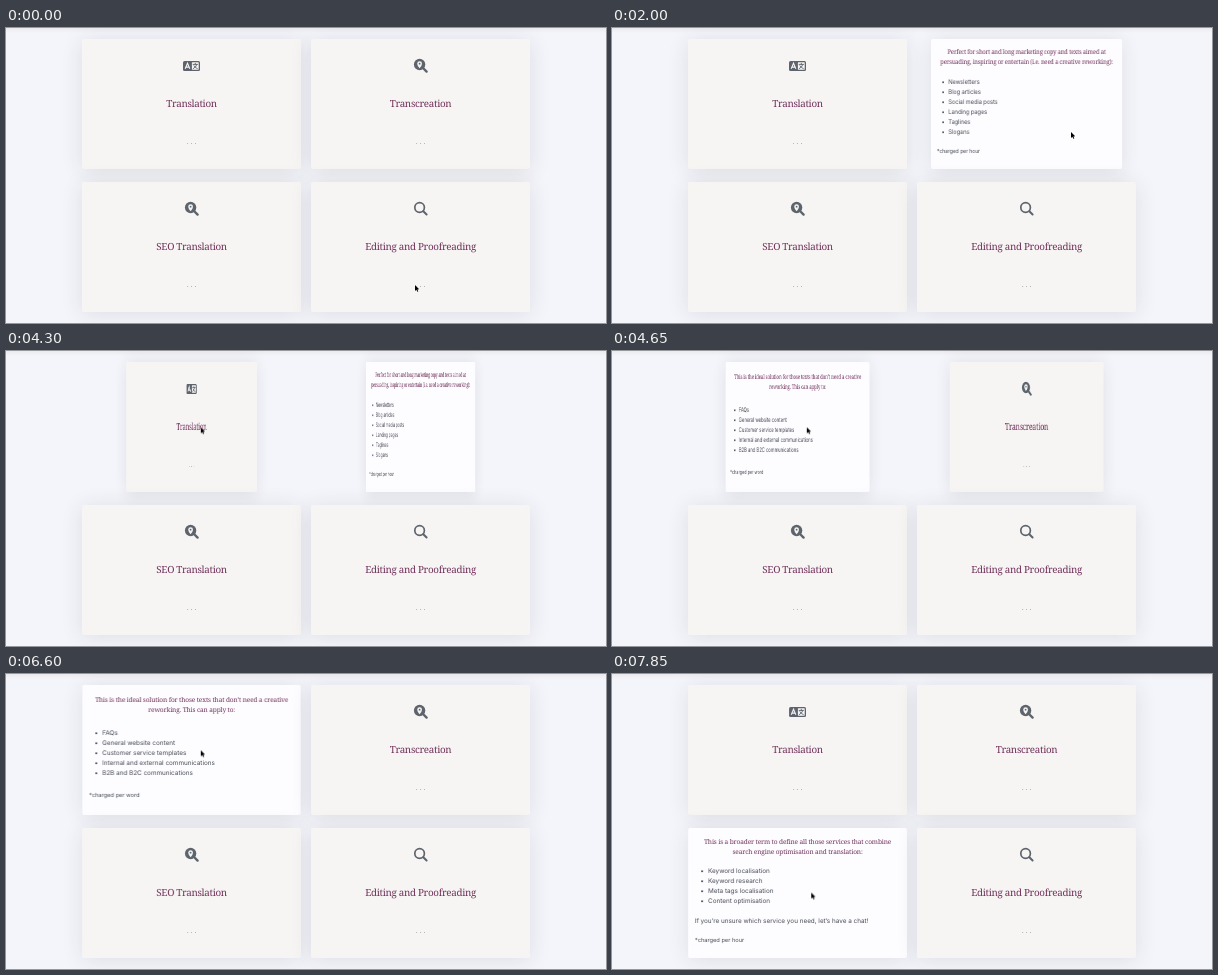
Recreate the animation shown at these times as an HTML page. Size 600 by 295 pixels, loop 8 s.

```html
<!DOCTYPE html>
<html lang="en">
<head>
<meta charset="utf-8">
<title>Service cards</title>
<style>
  html, body { margin: 0; width: 100%; height: 100%; overflow: hidden; }
  body { position: relative; background: #f4f5fa; }

  .top {
    position: absolute; inset: 0 0 auto; height: 5px;
    background: linear-gradient(#eaeaee, #f4f5fa);
  }

  .card {
    position: absolute; width: 219.4px; height: 130.4px;
    transform-style: preserve-3d;
    animation: 8s linear infinite;
  }
  .face {
    position: absolute; inset: 0; border-radius: 2px;
    background: #f7f5f3;
    box-shadow: 0 2px 22px rgba(45, 45, 50, .11);
    backface-visibility: hidden;
  }
  .back { background: #fdfcff; transform: rotateY(180deg); }
  .face svg { position: absolute; left: 0; top: 0; overflow: visible; }

  /* The first card's cycle begins when it is hovered, at 4 s. */
  #translation { left: 75.7px; top: 11px; animation-name: flip-first; animation-delay: -4s; }
  #transcreation { left: 305px; top: 11px; animation-name: flip-second; }
  #seo { left: 75.7px; top: 154px; animation-name: flip-third; }
  #editing { left: 305px; top: 154px; }

  @keyframes flip-first {
    0% { transform: rotateY(0); animation-timing-function: ease; }
    18.75%, 31.76% { transform: rotateY(180deg); animation-timing-function: ease; }
    50.51%, 100% { transform: rotateY(0); }
  }
  @keyframes flip-second {
    0%, 14.92% { transform: rotateY(0); animation-timing-function: ease; }
    33.67%, 49.7% { transform: rotateY(180deg); animation-timing-function: ease; }
    68.45%, 100% { transform: rotateY(0); }
  }
  /* The loop cuts this turn just short, so its easing is trimmed to match. */
  @keyframes flip-third {
    0%, 82.1% { transform: rotateY(0); animation-timing-function: cubic-bezier(.256, .098, .261, .9655); }
    100% { transform: rotateY(179.8deg); }
  }

  text { text-rendering: geometricPrecision; }
  .name { font: 9.8px "Noto Serif", serif; letter-spacing: -.3px; fill: #70305a; text-anchor: middle; }
  .lead { font: 6.53px "Noto Serif", serif; letter-spacing: -.12px; fill: #70305a; text-anchor: middle; }
  .item { font: 6.36px Inter, sans-serif; fill: #474c54; }
  .note { font: 5.7px Inter, sans-serif; fill: #474c54; }
  .dots { font: 7px Inter, sans-serif; letter-spacing: 1.9px; fill: #5d6167; text-anchor: middle; }
  .bullet { fill: #474c54; }
  .ink { fill: #5d646d; }
  .line { fill: none; stroke: #5d646d; stroke-linecap: round; }
  .paper { fill: #f7f5f3; }

  #pointer {
    position: absolute; left: 0; top: 0; width: 8px; height: 12px; overflow: visible;
    animation: roam 8s linear infinite;
  }
  .arrow { animation: arrow 8s step-end infinite; }
  .beam { animation: beam 8s step-end infinite; }

  @keyframes roam {
    0%, 1.875% { transform: translate(409px, 257px); }
    5% { transform: translate(604px, 165px); }
    6.25% { transform: translate(604px, 158px); animation-timing-function: ease-out; }
    9.375%, 15% { transform: translate(560px, 134px); }
    15.625% { transform: translate(516px, 118px); animation-timing-function: ease-out; }
    20.625%, 26.25% { transform: translate(459px, 104px); animation-timing-function: ease-in-out; }
    33.75%, 38.75% { transform: translate(367px, 73px); animation-timing-function: ease-out; }
    41.875%, 44.75% { transform: translate(346.5px, 73px); }
    45.625%, 50% { transform: translate(344.5px, 73px); }
    50.625% { transform: translate(280px, 74px); animation-timing-function: ease-out; }
    53.75%, 82.6% { transform: translate(194.8px, 76.3px); }
    83.25% { transform: translate(196px, 165px); animation-timing-function: ease-out; }
    86.875%, 100% { transform: translate(199.2px, 218.6px); }
  }
  @keyframes arrow {
    0% { opacity: 1; }
    32.5% { opacity: 0; }
    50.1%, 100% { opacity: 1; }
  }
  @keyframes beam {
    0% { opacity: 0; }
    32.5% { opacity: 1; }
    50.1%, 100% { opacity: 0; }
  }
</style>
</head>
<body>
<div class="top"></div>
<div class="card" id="translation"></div>
<div class="card" id="transcreation"></div>
<div class="card" id="seo"></div>
<div class="card" id="editing"></div>

<svg id="pointer">
  <path class="arrow" d="M0 0V6L1.4 4.8L2.3 6.8L3.3 6.4L2.4 4.5L4.2 4.3Z"
        fill="#000" stroke="#fff" stroke-width=".8" paint-order="stroke"/>
  <path class="beam" d="M-1.6 -4Q0 -4 0 -3V3Q0 4 -1.6 4M1.6 -4Q0 -4 0 -3V3Q0 4 1.6 4"
        fill="none" stroke="#222" stroke-width=".9"/>
</svg>

<script>
  const icons = {
    language: `
      <rect class="ink" x="101" y="22" width="17" height="10" rx="1.5"/>
      <rect class="paper" x="109.9" y="23.3" width="6.8" height="7.4" rx=".4"/>
      <path d="M103.2 29.8L105.5 24.3L107.8 29.8M104.1 28.1H106.9" fill="none" stroke="#f7f5f3" stroke-width="1.1"/>
      <path class="line" d="M111.1 25.4H115.5M113.3 24.3V25.4M114.8 25.6Q114 28.4 111.3 29.6M112 26.8Q113 28.8 115.3 29.6" stroke-width=".9"/>`,
    pin: `
      <path class="line" d="M112 29L115.6 32.6" stroke-width="2.4"/>
      <circle class="ink" cx="108.6" cy="25.5" r="5.7"/>
      <path class="paper" d="M108.6 29.3Q106.2 26.5 106.2 24.7A2.4 2.4 0 0 1 111 24.7Q111 26.5 108.6 29.3Z"/>
      <circle class="ink" cx="108.6" cy="24.7" r=".9"/>`,
    search: `
      <circle class="line" cx="108.6" cy="25.5" r="4.8" stroke-width="1.7"/>
      <path class="line" d="M112.3 29.2L115.6 32.5" stroke-width="2"/>`
  };

  const cards = [
    { id: "translation", name: "Translation", icon: "language", leadY: 15, listY: 48,
      lead: ["This is the ideal solution for those texts that don’t need a creative",
             "reworking. This can apply to:"],
      items: ["FAQs", "General website content", "Customer service templates",
              "Internal and external communications", "B2B and B2C communications"],
      note: "*charged per word", noteY: 110 },
    { id: "transcreation", name: "Transcreation", icon: "pin", leadY: 13, listY: 43,
      lead: ["Perfect for short and long marketing copy and texts aimed at",
             "persuading, inspiring or entertain (i.e. need a creative reworking):"],
      items: ["Newsletters", "Blog articles", "Social media posts",
              "Landing pages", "Taglines", "Slogans"],
      note: "*charged per hour", noteY: 112 },
    { id: "seo", name: "SEO Translation", icon: "pin", leadY: 14, listY: 43,
      lead: ["This is a broader term to define all those services that combine",
             "search engine optimisation and translation:"],
      items: ["Keyword localisation", "Keyword research",
              "Meta tags localisation", "Content optimisation"],
      extra: "If you’re unsure which service you need, let’s have a chat!",
      note: "*charged per hour", noteY: 112 },
    { id: "editing", name: "Editing and Proofreading", icon: "search" }
  ];

  // y is the middle of the line
  const text = (kind, x, y, s) => `<text class="${kind}" x="${x}" y="${y + 2.2}">${s}</text>`;
  const face = (kind, body) =>
    `<div class="face ${kind}"><svg width="219" height="130">${body}</svg></div>`;

  const front = c => icons[c.icon] + text("name", 109.6, 66.1, c.name) + text("dots", 110.5, 102.3, "...");

  const back = c =>
    c.lead.map((s, i) => text("lead", 109.6, c.leadY + 10 * i, s)).join("") +
    c.items.map((s, i) => {
      const y = c.listY + 10 * i;
      return `<circle class="bullet" cx="14" cy="${y + .2}" r="1"/>` + text("item", 20, y, s);
    }).join("") +
    (c.extra ? text("item", 6.7, 92.7, c.extra) : "") +
    text("note", 6.8, c.noteY - .2, c.note);

  for (const c of cards) {
    document.getElementById(c.id).innerHTML =
      face("front", front(c)) + (c.lead ? face("back", back(c)) : "");
  }
</script>
</body>
</html>
```
